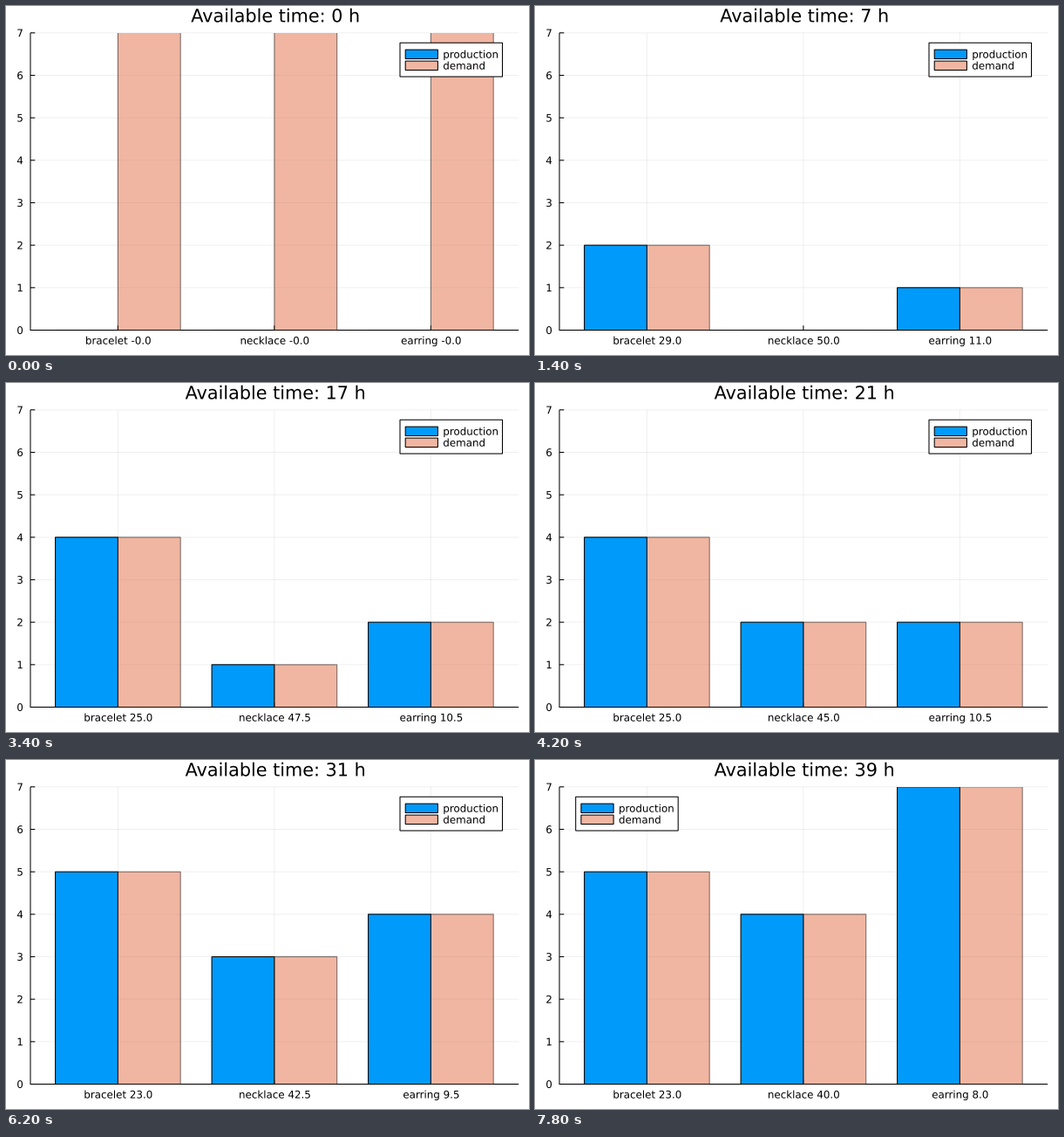
A matplotlib script for the animation above (8 s loop, 600 by 400 pixels).

```python
from itertools import product

import matplotlib.pyplot as plt
from matplotlib.animation import FuncAnimation
from matplotlib.patches import PathPatch, Rectangle
from matplotlib.path import Path
from matplotlib.textpath import TextPath
from matplotlib.transforms import Affine2D

W, H, DPI = 600, 400, 100
PX = 72 / DPI
LEFT, RIGHT, TOP, BASE = 28, 588.2, 30.8, 371.5
UNIT = (BASE - TOP) / 7
CENTERS = (128.4, 307.9, 487.4)
BAR = 71.8
BIG, SMALL = 20.75, 11.87
LABEL_BASE = 387.6
BLUE = "#009afa"
ORANGE = (0.886, 0.435, 0.275, 0.5)
HOURS = 40

# name, top price, price drop per unit, cost per unit, hours per unit
GOODS = (
    ("bracelet", 33, 2, 3, 2.5),
    ("necklace", 50, 2.5, 19, 4),
    ("earring", 11.5, 0.5, 1, 1.5),
)


def profit(counts):
    return sum(q * (top - drop * q - cost)
               for q, (_, top, drop, cost, _) in zip(counts, GOODS))


def effort(counts):
    return sum(q * good[4] for q, good in zip(counts, GOODS))


OPTIONS = list(product(range(9), range(6), range(12)))


def best_plan(hours):
    return max((c for c in OPTIONS if effort(c) <= hours), key=profit)


def price_of(good, count, hours):
    _, top, drop, _, need = good
    return -0.0 if need > hours else float(top - drop * count)


plt.rcParams["font.family"] = "DejaVu Sans"
plt.rcParams["path.snap"] = False
fig = plt.figure(figsize=(W / DPI, H / DPI), dpi=DPI, facecolor="white")
ax = fig.add_axes([0, 0, 1, 1])
ax.set_xlim(0, W)
ax.set_ylim(H, 0)
ax.axis("off")

legend_shift = Affine2D()
legend_trans = legend_shift + ax.transData


def glyphs(text, x, base, size, align="origin"):
    shape = TextPath((0, 0), text, size=size)
    verts = shape.vertices * [1, -1]
    lo, hi = verts[:, 0].min(), verts[:, 0].max()
    x -= {"origin": 0, "left": lo, "center": (lo + hi) / 2}[align]
    return Path(verts + [x, base], shape.codes)


def write(*args, z=4, **kw):
    patch = PathPatch(glyphs(*args, **kw), fc="black", lw=0, zorder=z)
    ax.add_artist(patch)
    return patch


def line(x0, y0, x1, y1, z, **style):
    ax.plot([x0, x1], [y0, y1], color="black", lw=1.05 * PX, zorder=z,
            solid_capstyle="butt", **style)


def box(x, y, w, h, fill, z, edge="black"):
    rect = Rectangle((x, y), w, h, fc=fill, ec=edge, lw=1.05 * PX, zorder=z)
    ax.add_artist(rect)
    return rect


# Grid, axes and ticks
for k in range(8):
    y = BASE - k * UNIT
    line(LEFT, y, RIGHT, y, 1, alpha=0.06)
    line(LEFT, y, LEFT + 5.3, y, 2)
    write(str(k), 12.3, y + 4.4, SMALL)
for x in CENTERS:
    line(x, TOP, x, BASE, 1, alpha=0.06)
    line(x, BASE, x, BASE - 5.3, 2)
line(LEFT, TOP, LEFT, BASE + 0.5, 2)
line(LEFT, BASE, RIGHT, BASE, 2)

# Bars
window = Rectangle((LEFT, TOP), RIGHT - LEFT, BASE - TOP + 1,
                   transform=ax.transData)
made = [box(x - BAR, BASE, BAR, 0, BLUE, 3) for x in CENTERS]
wanted = [box(x, BASE, BAR, 0, ORANGE, 3.5, (0, 0, 0, 0.5)) for x in CENTERS]
for bar in made + wanted:
    bar.set_clip_path(window)

title = write("0", 0, 0, BIG)
labels = [write(good[0], x, LABEL_BASE, SMALL)
          for good, x in zip(GOODS, CENTERS)]

# Legend
legend = [box(452, 42.2, 117.5, 38.8, "white", 5)]
for text, fill, mid in (("production", BLUE, 55.3), ("demand", ORANGE, 68.3)):
    legend.append(box(458.2, mid - 5.2, 37.2, 10.4, fill, 6))
    legend.append(write(text, 501.3, mid + 4.3, SMALL, align="left", z=7))
for part in legend:
    part.set_transform(legend_trans)


def draw(hours):
    plan = best_plan(hours)
    title.set_path(glyphs(f"Available time: {hours} h", 308.3, 18.4, BIG,
                          align="center"))
    for i, (good, count) in enumerate(zip(GOODS, plan)):
        name, top, drop = good[:3]
        price = price_of(good, count, hours)
        made[i].set_height(-count * UNIT)
        wanted[i].set_height(-(top - price) / drop * UNIT)
        labels[i].set_path(glyphs(f"{name} {price}", CENTERS[i], LABEL_BASE,
                                  SMALL, align="center"))
    # The legend takes the left corner when only the right one is crowded
    crowded = 6 <= plan[2] <= 7 and plan[0] < 6
    legend_shift.clear().translate(-405.3 if crowded else 0, 0)
    return [title, *made, *wanted, *labels, *legend]


anim = FuncAnimation(fig, draw, frames=HOURS, interval=200, repeat=True,
                     repeat_delay=0, init_func=lambda: draw(0), blit=False)
plt.show()
```
